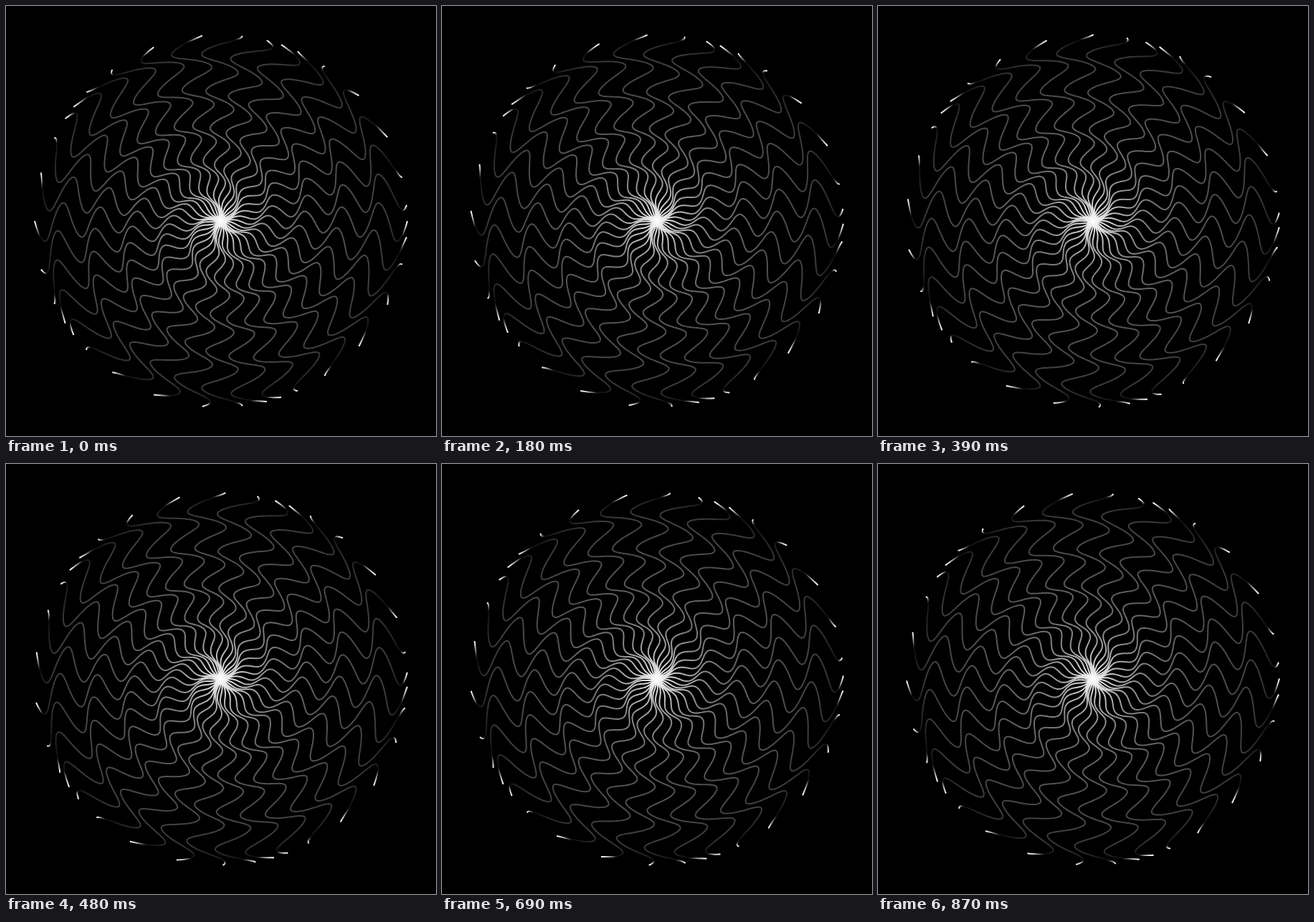
Recreate the animation shown at these times as an HTML page. Size 600 by 600 pixels, loop 900 ms.

```html
<!DOCTYPE html>
<html lang="en">
<head>
<meta charset="utf-8">
<title>Rippling rays</title>
<style>
  html, body { margin: 0; width: 100%; height: 100%; overflow: hidden; background: #000; }
  svg { display: block; width: 100%; height: 100%; }
</style>
</head>
<body>
<svg viewBox="0 0 600 600">
  <defs>
    <radialGradient id="shade" gradientUnits="userSpaceOnUse" cx="300" cy="300" r="260">
      <stop offset="0" stop-color="#fff"/>
      <stop offset=".06" stop-color="#dcdcdc"/>
      <stop offset=".14" stop-color="#b4b4b4"/>
      <stop offset=".24" stop-color="#8c8c8c"/>
      <stop offset=".38" stop-color="#6c6c6c"/>
      <stop offset=".58" stop-color="#545454"/>
      <stop offset=".78" stop-color="#464646"/>
      <stop offset=".9" stop-color="#3a3a3a"/>
      <stop offset=".95" stop-color="#222"/>
      <stop offset=".975" stop-color="#0c0c0c"/>
      <stop offset=".983" stop-color="#707070"/>
      <stop offset=".992" stop-color="#d0d0d0"/>
      <stop offset="1" stop-color="#fff"/>
    </radialGradient>
  </defs>
  <rect width="600" height="600" fill="#000"/>
  <path id="rays" fill="none" stroke="url(#shade)" stroke-width="2" stroke-linejoin="round"/>
</svg>
<script>
  const LOOP = 900, STEP = 30;
  const RAYS = 36, RADIUS = 260, WAVE = 52, SWING = 0.115;
  const TAU = Math.PI * 2;
  const rays = document.getElementById("rays");

  // The ripple stays fixed in space while the rays turn through it.
  function ray(base) {
    let d = "";
    for (let r = 0; r <= RADIUS; r++) {
      const a = base - SWING * Math.sin(5 * base + TAU * r / WAVE);
      const x = 300 + r * Math.cos(a), y = 300 + r * Math.sin(a);
      d += (r ? "L" : "M") + x.toFixed(2) + " " + y.toFixed(2);
    }
    return d;
  }

  function draw(ms) {
    const turn = Math.floor((ms % LOOP) / STEP) * STEP / LOOP;
    let d = "";
    for (let i = 0; i < RAYS; i++) d += ray((i + turn) / RAYS * TAU);
    rays.setAttribute("d", d);
  }

  const start = performance.now();
  function tick() {
    draw(performance.now() - start);
    requestAnimationFrame(tick);
  }
  tick();
</script>
</body>
</html>
```
